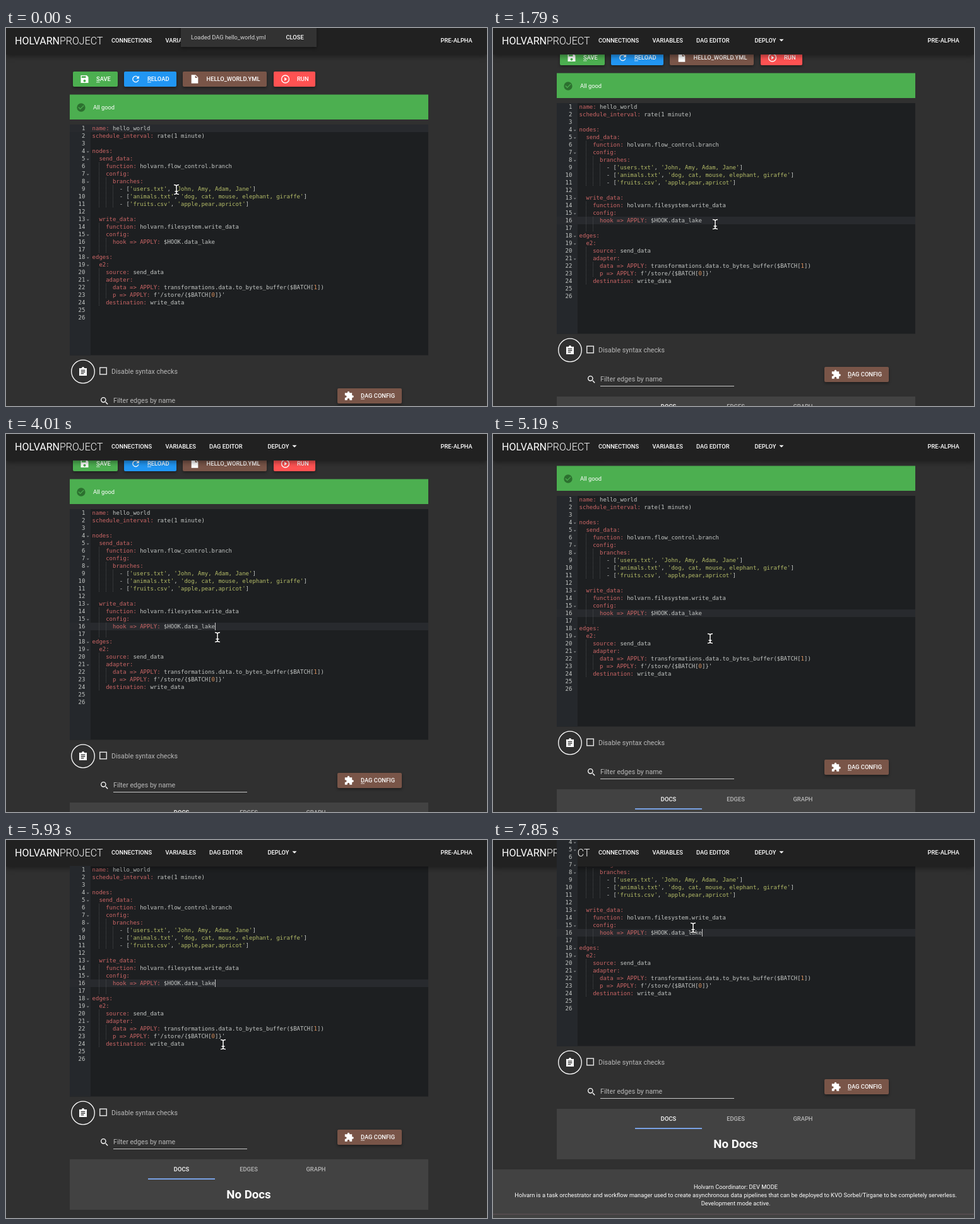
These frames come from a looping animation (762x599 px, 8000 ms). An HTML page with a canvas:

```html
<!DOCTYPE html>
<html lang="en">
<head>
<meta charset="utf-8">
<title>Workflow editor</title>
<style>
html, body { margin: 0; width: 100%; height: 100%; overflow: hidden; background: #303030; }
canvas { display: block; }
</style>
</head>
<body>
<canvas id="stage" width="762" height="599"></canvas>
<script>
const ctx = document.getElementById('stage').getContext('2d');
const LOOP = 8000, TICK = LOOP / 54;
const CHAR = 5.4, ROW = 12, CODE_X = 136.6, CODE_Y = 153;
const FG = '#c5c8c6', KEY = '#cc6666', STR = '#b5bd68', NUM = '#de935f';

const code = `name: hello_world
schedule_interval: rate(1 minute)

nodes:
  send_data:
    function: holvarn.flow_control.branch
    config:
      branches:
        - ['users.txt', 'John, Amy, Adam, Jane']
        - ['animals.txt', 'dog, cat, mouse, elephant, giraffe']
        - ['fruits.csv', 'apple,pear,apricot']

  write_data:
    function: holvarn.filesystem.write_data
    config:
      hook => APPLY: $HOOK.data_lake
${' '.repeat(6)}
edges:
  e2:
    source: send_data
    adapter:
      data => APPLY: transformations.data.to_bytes_buffer($BATCH[1])
      p => APPLY: f'/store/{$BATCH[0]}'
    destination: write_data

`.split('\n');
const foldable = code.map(line => /^\s*\w+:$/.test(line));

const ring = (x, y, r) => `M${x - r} ${y}a${r} ${r} 0 1 0 ${2 * r} 0a${r} ${r} 0 1 0 ${-2 * r} 0Z`;
const icons = {
  save: 'M3 3H17L21 7V21H3ZM5 5V9H15V5Z' + ring(12, 16, 3),
  reload: 'M17.65 6.35A8 8 0 1 0 19.7 14H17.6A6 6 0 1 1 16.2 7.8L13 11H20V4Z',
  file: 'M4 2H14L20 8V22H4ZM13 3.5V9H18.5Z',
  play: ring(12, 12, 10) + ring(12, 12, 8) + 'M10 7.5V16.5L16 12Z',
  check: ring(12, 12, 10) + 'M5 12L6.4 10.6L10 14.2L17.6 6.6L19 8L10 17Z',
  clipboard: 'M3 3H9a3 3 0 0 1 6 0H21V21H3ZM7 7V9H17V7ZM7 11V13H17V11ZM7 15V17H14V15Z',
  search: ring(9.5, 9.5, 6.5) + ring(9.5, 9.5, 4.5) + 'M14 15.5L15.5 14L20.5 19L19 20.5Z',
  puzzle: 'M2 5H8V3.5a2.5 2.5 0 0 1 5 0V5H19V11H20.5a2.5 2.5 0 0 1 0 5H19V22H13.2V20.5' +
    'a2.7 2.7 0 0 0-5.4 0V22H2V16.2H3.5a2.7 2.7 0 0 0 0-5.4H2Z'
};
for (const name in icons) icons[name] = new Path2D(icons[name]);

// Keys are [tick, value, ...], linear between neighbours.
const scrollKeys = [[1, 0], [2, 6], [4, 30], [5, 34], [29, 34], [33, 52], [34, 52], [35, 55],
  [37, 103], [39, 103], [40, 112], [42, 180], [43, 180], [44, 193], [45, 192]];
const mouseKeys = [[4, 270, 256], [8, 352, 311], [26, 352, 311], [27, 335, 322], [29, 344, 324],
  [44, 344, 324], [48, 387, 442], [49, 387, 442], [53, 317, 139]];

function sample(keys, tick) {
  const i = keys.findIndex(k => k[0] >= tick);
  if (i === 0) return keys[0].slice(1);
  if (i < 0) return keys[keys.length - 1].slice(1);
  const a = keys[i - 1], b = keys[i], p = (tick - a[0]) / (b[0] - a[0]);
  return a.slice(1).map((v, j) => Math.round(v + (b[j + 1] - v) * p));
}

const between = (v, from, to) => v >= from && v < to;

function rect(x, y, w, h, color) {
  ctx.fillStyle = color;
  ctx.fillRect(x, y, w, h);
}

function withShadow(blur, dy, draw) {
  ctx.save();
  ctx.shadowColor = 'rgba(0,0,0,.4)';
  ctx.shadowBlur = blur;
  ctx.shadowOffsetY = dy;
  draw();
  ctx.restore();
}

// y is the middle of the capitals.
function text(str, x, y, { size = 9.33, weight = 400, color = '#fff', align = 'left' } = {}) {
  ctx.font = `${weight} ${size}px Roboto, sans-serif`;
  ctx.fillStyle = color;
  ctx.textAlign = align;
  ctx.fillText(str, x, y + size * 0.36);
  return ctx.measureText(str).width;
}

function mono(str, x, y, color, align = 'left') {
  ctx.font = '8.97px "DejaVu Sans Mono", monospace';
  ctx.fillStyle = color;
  ctx.textAlign = align;
  ctx.fillText(str, x, y + 3);
}

function icon(name, cx, cy, color = '#fff', size = 16) {
  ctx.save();
  ctx.translate(cx - size / 2, cy - size / 2);
  ctx.scale(size / 24, size / 24);
  ctx.fillStyle = color;
  ctx.fill(icons[name], 'evenodd');
  ctx.restore();
}

function button(x, y, w, color, glyph, iconX, label, labelX, underline) {
  withShadow(4, 2, () => {
    ctx.fillStyle = color;
    ctx.beginPath();
    ctx.roundRect(x, y, w, 24, 2);
    ctx.fill();
  });
  icon(glyph, iconX, y + 12);
  text(label, labelX, y + 12, { weight: 500 });
  if (underline) rect(labelX, y + 16.5, ctx.measureText(label[0]).width, 0.8, '#fff');
}

function drawToolbarButtons() {
  button(106, 69, 71, '#4caf50', 'save', 124.5, 'SAVE', 143, true);
  button(187, 69, 83, '#2196f3', 'reload', 205.5, 'RELOAD', 224, true);
  button(280, 69, 133, '#795548', 'file', 299, 'HELLO_WORLD.YML', 317.5);
  button(424, 69, 66, '#ff5252', 'play', 442.5, 'RUN', 461);
}

function drawCodeLine(line, y) {
  const indent = line.search(/\S|$/);
  ctx.strokeStyle = '#4a4c4e';
  ctx.lineWidth = 1;
  ctx.setLineDash([1, 1]);
  ctx.beginPath();
  for (let g = 1; g < indent / 2; g++) {
    const x = Math.floor(CODE_X + g * 2 * CHAR) + 0.5;
    ctx.moveTo(x, y - 6);
    ctx.lineTo(x, y + 6);
  }
  ctx.stroke();
  ctx.setLineDash([]);

  let col = indent;
  const put = (str, color) => {
    mono(str, CODE_X + col * CHAR, y, color);
    col += str.length;
  };
  const body = line.slice(indent);
  if (body[0] === '-') {
    body.split(/('[^']*')/).forEach((part, i) => put(part, i % 2 ? STR : FG));
    return;
  }
  const [, key, rest] = /^([\w=> ]+:)?(.*)$/.exec(body);
  if (key) put(key, KEY);
  rest.split(/(\d(?=\]))/).forEach((part, i) => put(part, i % 2 ? NUM : FG));
}

function drawEditor(tick) {
  const active = tick < 8 ? 0 : 15;
  const removed = between(tick, 13, 24) ? Math.min(9, (tick - 12) * 3) : 0;
  rect(101, CODE_Y, 568, 365.5, '#1d1f21');
  rect(134, CODE_Y + active * ROW, 535, ROW, '#282a2e');
  code.forEach((line, i) => {
    const shown = i === 15 ? line.slice(0, line.length - removed) : line;
    drawCodeLine(shown, CODE_Y + 6 + i * ROW);
  });

  const caretOn = between(tick, 8, 12) || between(tick, 13, 19) || between(tick, 21, 32) || tick >= 37;
  const caretX = Math.floor(CODE_X + (code[15].length - removed) * CHAR);
  if (caretOn) rect(caretX, CODE_Y + 15 * ROW, 1, ROW, '#c8c8c8');

  if (between(tick, 21, 24)) {
    const y = CODE_Y + 16 * ROW;
    rect(279, y, 187, ROW, '#484747');
    rect(280, y + 0.5, 185, ROW - 1, '#494949');
    mono('data_lake', 282, y + 6, '#c1c1c1');
  }
}

function drawGutter(tick) {
  rect(101, CODE_Y, 33, 365.5, '#25282c');
  rect(101, CODE_Y + (tick < 8 ? 0 : 15) * ROW, 33, ROW, '#282a2e');
  code.forEach((line, i) => {
    const y = CODE_Y + 6 + i * ROW;
    mono(i + 1, 125.3, y, FG, 'right');
    if (foldable[i]) triangle(129.7, y + 0.5, 2, 2, '#85888a');
  });
}

function triangle(x, y, halfWidth, height, color) {
  ctx.fillStyle = color;
  ctx.beginPath();
  ctx.moveTo(x - halfWidth, y);
  ctx.lineTo(x + halfWidth, y);
  ctx.lineTo(x, y + height);
  ctx.fill();
}

function drawControls() {
  ctx.strokeStyle = '#fff';
  ctx.lineWidth = 1.3;
  ctx.beginPath();
  ctx.arc(122, 544.5, 18.3, 0, Math.PI * 2);
  ctx.stroke();
  icon('clipboard', 122, 545);
  ctx.strokeStyle = '#e0e0e0';
  ctx.lineWidth = 1.5;
  ctx.strokeRect(148.7, 538.2, 10.6, 10.6);
  text('Disable syntax checks', 167, 544, { size: 10.67, color: '#b8b8b8' });
  icon('search', 156, 591);
  text('Filter edges by name', 170, 590.5, { size: 10.67, color: '#b8b8b8' });
  rect(170, 601, 212, 1, '#c8c8c8');
  button(525, 571, 102, '#795548', 'puzzle', 543.5, 'DAG CONFIG', 562, true);
}

function drawDocs() {
  rect(101, 618, 568, 80, '#424242');
  [['DOCS', 278, '#fff'], ['EDGES', 384.5, '#b8b8b8'], ['GRAPH', 491, '#b8b8b8']].forEach(
    ([label, x, color]) => text(label, x, 634, { weight: 500, color, align: 'center' }));
  rect(225, 648.3, 106, 1.7, '#82b1ff');
  text('No Docs', 384.5, 673, { size: 18.67, weight: 700, align: 'center' });
}

function drawFooter() {
  rect(0, 714, 762, 100, '#424242');
  ['Holvarn Coordinator: DEV MODE',
    'Holvarn is a task orchestrator and workflow manager used to create asynchronous data pipelines ' +
    'that can be deployed to KVO Sorbel/Tirgane to be completely serverless.',
    'Development mode active.'
  ].forEach((line, i) => text(line, 384.5, 742 + i * 13, { size: 9.3, align: 'center' }));
}

function drawHeader() {
  withShadow(8, 3, () => rect(0, 0, 762, 42, '#212121'));
  const width = text('HOLVARN', 14, 20, { size: 16 });
  text('PROJECT', 14 + width, 20, { size: 16, weight: 300 });
  [['CONNECTIONS', 167], ['VARIABLES', 252.5], ['DAG EDITOR', 322], ['DEPLOY', 414.5], ['PRE-ALPHA', 688.5]]
    .forEach(([label, x]) => text(label, x, 20, { weight: 500 }));
  triangle(457, 17.7, 3.5, 3.5, '#fff');
}

function drawToast() {
  withShadow(5, 2, () => rect(277, -4, 215, 34, '#323232'));
  text('Loaded DAG hello_world.yml', 293, 15, { color: '#d8d8d8' });
  text('CLOSE', 443.5, 15, { weight: 500 });
}

function drawMouse(x, y) {
  const beam = new Path2D('M-4-7.5Q0-7.5 0-5Q0-7.5 4-7.5M0-5V5M-4 7.5Q0 7.5 0 5Q0 7.5 4 7.5M-2.5 3H2.5');
  ctx.save();
  ctx.translate(x, y);
  for (const [width, color] of [[3.2, '#111'], [1.5, '#fff']]) {
    ctx.lineWidth = width;
    ctx.strokeStyle = color;
    ctx.stroke(beam);
  }
  ctx.restore();
}

function render(now) {
  const tick = Math.floor((now % LOOP) / TICK + 0.03);
  const [scroll] = sample(scrollKeys, tick);
  rect(0, 0, 762, 599, '#303030');

  ctx.save();
  ctx.translate(0, -scroll);
  drawToolbarButtons();
  rect(101, 105.5, 568, 39.5, '#4caf50');
  icon('check', 119, 126, '#2c702f');
  text('All good', 138, 126);
  drawEditor(tick);
  drawControls();
  drawDocs();
  drawFooter();
  ctx.restore();

  if (scroll > 150) rect(0, 592.5, 762, 1, '#65555a');
  drawHeader();

  // The gutter is stacked above the header.
  ctx.save();
  ctx.translate(0, -scroll);
  drawGutter(tick);
  ctx.restore();

  if (tick < 3) drawToast();
  if (!between(tick, 13, 27)) drawMouse(...sample(mouseKeys, tick));
}

let start;
function frame(now) {
  start ??= now;
  render(now - start);
  requestAnimationFrame(frame);
}
render(0);
requestAnimationFrame(frame);
</script>
</body>
</html>
```
